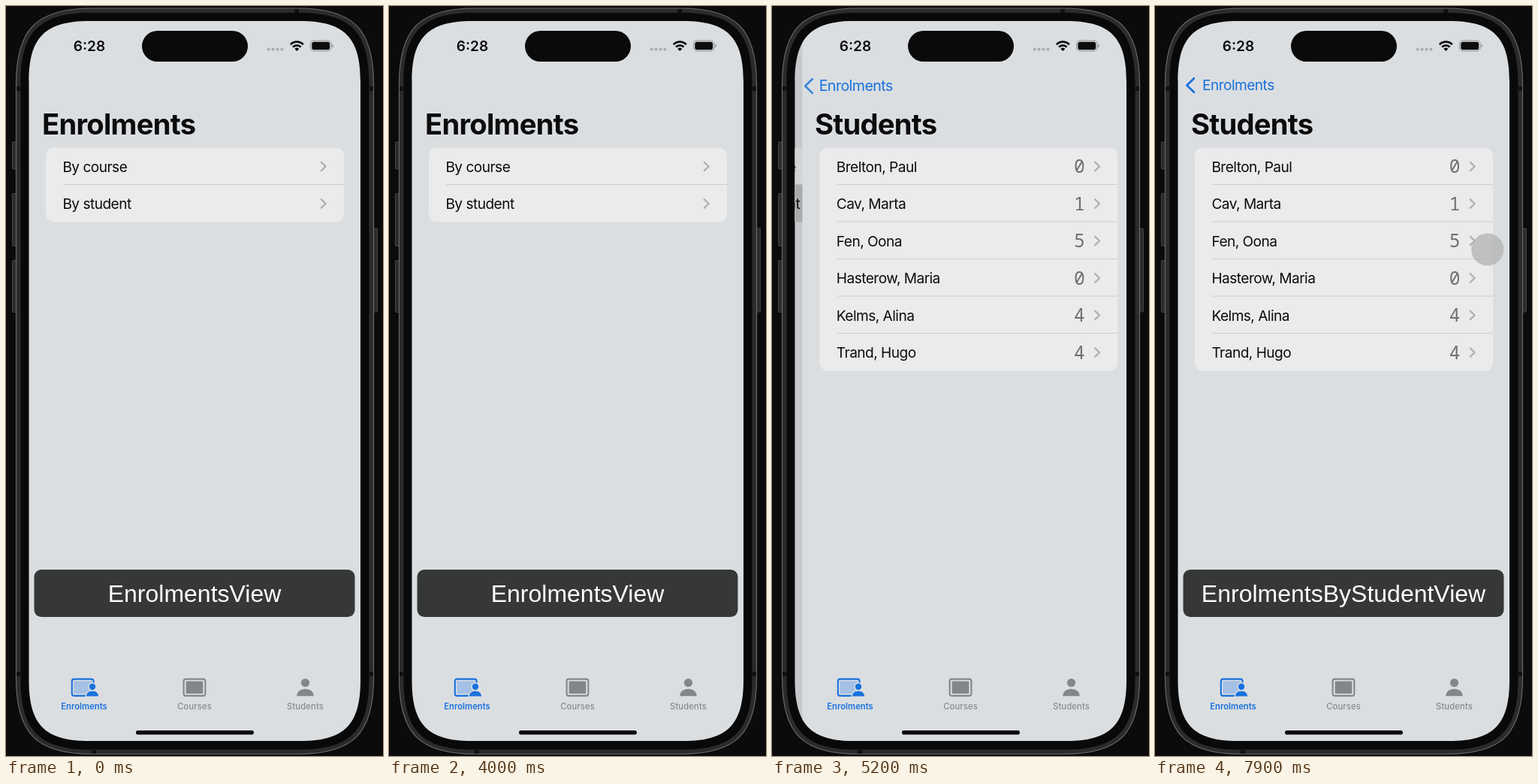
Animation of 502 by 998 pixels, one loop 8000 ms. Source, as an HTML page:

```html
<!DOCTYPE html>
<html lang="en">
<head>
<meta charset="utf-8">
<title>Enrolments</title>
<style>
  html, body { margin: 0; width: 100%; height: 100%; overflow: hidden; background: #0b0b0b; }
  svg { display: block; width: 100vw; height: 100vh; }
  text { font-family: Inter, "Liberation Sans", sans-serif; fill: #0c0c0d; }
  .title { font-size: 38.2px; font-weight: 700; letter-spacing: -.75px; }
  .row, .back { font-size: 19.1px; letter-spacing: -.53px; }
  .back { fill: #1871dc; }
  .clock { font-size: 19.1px; font-weight: 600; }
  .count { font: 24.5px "Noto Sans Mono", "DejaVu Sans Mono", monospace; fill: #6f6f70; text-anchor: middle; }
  .tab { font-size: 11.2px; font-weight: 500; letter-spacing: .15px; fill: #88898b; text-anchor: middle; }
  .tab.on { fill: #1871dc; font-weight: 600; letter-spacing: .05px; }
  .banner rect { fill: #363837; }
  .banner text { font: 32px "Liberation Sans", Arial, sans-serif; fill: #fff; text-anchor: middle; }
  .list { fill: #ebebeb; }
  .rule { stroke: #cdcecf; stroke-width: 1; }
  .chevron { fill: none; stroke: #b0b0b2; stroke-width: 2.3; stroke-linecap: round; stroke-linejoin: round; }
  .metal { fill: #2b2b2b; stroke: #444; stroke-width: 1; }
  .mark { fill: #111; }
</style>
</head>
<body>
<svg viewBox="0 0 502 998" preserveAspectRatio="none">
  <defs>
    <clipPath id="screen"><path id="screenShape"/></clipPath>
    <clipPath id="shortList"><rect x="53" y="188.5" width="397" height="99" rx="11"/></clipPath>
  </defs>

  <!-- phone body -->
  <rect width="502" height="998" fill="#0b0b0b"/>
  <g class="metal">
    <rect x="8.5" y="181" width="6" height="36" rx="1"/>
    <rect x="8.5" y="249.5" width="6" height="70" rx="1"/>
    <rect x="8.5" y="338.5" width="6" height="69" rx="1"/>
    <rect x="488" y="296" width="6.5" height="111" rx="1"/>
  </g>
  <path id="body" fill="#2b2b2b" stroke="#686868" stroke-width="1.2"/>
  <g class="mark">
    <rect x="384" y="4" width="6" height="5"/>
    <rect x="114" y="990" width="6" height="5"/>
    <rect x="14" y="107" width="5" height="6"/>
    <rect x="484" y="107" width="5" height="6"/>
    <rect x="14" y="886" width="5" height="6"/>
    <rect x="484" y="886" width="5" height="6"/>
  </g>
  <path id="bezel" fill="#090909"/>

  <g clip-path="url(#screen)">
    <g id="oldPage">
      <rect x="28" y="18" width="446" height="962" fill="#dbdee1"/>
      <g clip-path="url(#shortList)">
        <rect class="list" x="53" y="188.5" width="397" height="99"/>
        <rect id="pressed" x="53" y="238" width="397" height="50" fill="#bebec0"/>
      </g>
      <g id="menu"></g>
    </g>
    <rect id="dim" x="28" y="18" width="446" height="962"/>
    <g id="newPage">
      <rect x="30" y="18" width="444" height="962" fill="#dbdee1"/>
      <rect class="list" x="53" y="188.5" width="397" height="297" rx="11"/>
      <g id="people"></g>
    </g>

    <!-- navigation bar -->
    <text id="newTitle" class="title" x="48" y="171">Students</text>
    <g id="oldTitle"><text class="title">Enrolments</text></g>
    <g id="back"><text class="back">Enrolments</text></g>
    <path id="backArrow" d="M52 96.2l-9.6 9.3 9.6 9.3" fill="none" stroke="#1871dc" stroke-width="2.7" stroke-linecap="round" stroke-linejoin="round"/>

    <!-- status bar -->
    <text class="clock" x="89.8" y="60">6:28</text>
    <rect x="181" y="33" width="141" height="41" rx="20.5" fill="#0a0a0a"/>
    <g fill="#abaeb0">
      <circle cx="349.7" cy="57.7" r="2.1"/><circle cx="355.6" cy="57.7" r="2.1"/>
      <circle cx="361.5" cy="57.7" r="2.1"/><circle cx="367.4" cy="57.7" r="2.1"/>
    </g>
    <g fill="none" stroke="#0c0c0d" stroke-width="2.7">
      <path d="M378.8 51.2a12 12 0 0 1 17 0"/>
      <path d="M382 54.6a7.5 7.5 0 0 1 10.6 0"/>
      <path d="M384.3 57a4.3 4.3 0 0 1 6 0l-3 3z" fill="#0c0c0d" stroke="none"/>
    </g>
    <rect x="405.5" y="46" width="27.5" height="14" rx="4.5" fill="none" stroke="#929496" stroke-width="1.1"/>
    <rect x="407.3" y="47.8" width="23.9" height="10.4" rx="2.8" fill="#0c0c0d"/>
    <path d="M434.4 50.7q1.8.8 1.8 2.3t-1.8 2.3z" fill="#929496"/>

    <!-- tab bar -->
    <rect x="87.8" y="895.6" width="28.8" height="22.3" rx="3" fill="none" stroke="#1871dc" stroke-width="2.1"/>
    <rect x="90.3" y="898.2" width="23.8" height="17.1" rx="1" fill="#a5c0e5"/>
    <g fill="#1871dc" stroke="#dbdee1" stroke-width="3" paint-order="stroke">
      <path d="M107 918.6c0-4.2 3.3-7 8-7s8 2.8 8 7z"/>
      <circle cx="115" cy="905.8" r="4.2"/>
    </g>
    <rect x="236.6" y="895.6" width="28.8" height="22.3" rx="3" fill="none" stroke="#858688" stroke-width="2.1"/>
    <rect x="239.7" y="898.6" width="22.6" height="16.3" rx="1" fill="#858688"/>
    <g fill="#858688">
      <circle cx="398.5" cy="900.5" r="5.6"/>
      <path d="M387.3 918.2c0-5.6 4.8-9.4 11.2-9.4s11.2 3.8 11.2 9.4z"/>
    </g>
    <text class="tab on" x="104" y="936">Enrolments</text>
    <text class="tab" x="251" y="936">Courses</text>
    <text class="tab" x="398.5" y="936">Students</text>
    <rect x="173" y="964" width="157" height="5.6" rx="2.8" fill="#0a0a0a"/>
  </g>

  <g class="banner">
    <rect id="bannerBox" x="37.5" y="750" width="427" height="63" rx="9.5"/>
    <text id="bannerText" x="251" y="793"></text>
  </g>
  <circle id="touch" fill="#b0b0b1"/>
</svg>

<script>
const LOOP = 8000, STEP = 100;
const PUSH_START = 4650, PUSH_END = 5400, SPRING = 10.26;
const $ = id => document.getElementById(id);
const clamp = (v, lo = 0, hi = 1) => Math.min(hi, Math.max(lo, v));
const mix = (a, b, k) => a + (b - a) * k;
const set = (id, attrs) => {
  for (const key in attrs) $(id).setAttribute(key, attrs[key]);
};

// Rounded rectangle whose corners ease into the straight sides
function smoothRect(x, y, w, h, r) {
  const a = 1.3 * r, b = a - 0.952 * r;
  return `M${x + a} ${y}h${w - 2 * a}c${a - b} 0 ${a} ${b} ${a} ${a}` +
    `v${h - 2 * a}c0 ${a - b} ${-b} ${a} ${-a} ${a}` +
    `h${2 * a - w}c${b - a} 0 ${-a} ${-b} ${-a} ${-a}` +
    `v${2 * a - h}c0 ${b - a} ${b} ${-a} ${a} ${-a}z`;
}
set("body", { d: smoothRect(13.5, 3, 476, 992.5, 78) });
set("bezel", { d: smoothRect(19.5, 9, 464, 980.5, 72) });
set("screenShape", { d: smoothRect(30.5, 20, 441.5, 958, 62) });

function fillList(id, rows) {
  $(id).innerHTML = rows.map(([label, count], i) => {
    const y = 213.5 + 49.5 * i;
    return `<text class="row" x="75.4" y="${y + 7}">${label}</text>` +
      (count === undefined ? "" : `<text class="count" x="399" y="${y + 8.8}">${count}</text>`) +
      `<path class="chevron" d="M419.8 ${y - 5.7}l5.9 5.7-5.9 5.7"/>` +
      (i ? `<path class="rule" d="M76 ${y - 25.5}H450"/>` : "");
  }).join("");
}
fillList("menu", [["By course"], ["By student"]]);
fillList("people", [
  ["Brelton, Paul", 0], ["Cav, Marta", 1], ["Fen, Oona", 5],
  ["Hasterow, Maria", 0], ["Kelms, Alina", 4], ["Trand, Hugo", 4]
]);

// Critically damped spring from 0 to 1
function pushProgress(t) {
  if (t < PUSH_START) return 0;
  if (t >= PUSH_END) return 1;
  const s = SPRING * (t - PUSH_START) / 1000;
  return 1 - (1 + s) * Math.exp(-s);
}

function drawPush(t) {
  const p = pushProgress(t), q = 1 - p;
  set("oldPage", { transform: `translate(${-132.5 * p} 0)`, opacity: q ? 1 : 0 });
  set("newPage", { transform: `translate(${442 * q} 0)` });
  set("dim", { opacity: q ? 0.1 * p : 0 });
  set("newTitle", { transform: `translate(${380 * q} 0)`, opacity: p ? 1 : 0 });
  const x = mix(48, 63, p), y = mix(171, 112, p);
  set("oldTitle", { transform: `translate(${x} ${y}) scale(${mix(1, 0.478, p)})`, opacity: clamp(1 - 1.6 * p) });
  set("back", { transform: `translate(${x} ${y}) scale(${mix(2.09, 1, p)})`, opacity: clamp(1.8 * p - 0.6) });
  set("backArrow", { transform: `translate(${75 * q} ${45 * q})`, opacity: clamp(1 - 8 * q) });
  set("pressed", { opacity: t >= 4600 ? 1 : 0 });
}

function drawBanner(t) {
  const label = t < 4700 ? "EnrolmentsView" : t < PUSH_END ? "" : "EnrolmentsByStudentView";
  if ($("bannerText").textContent !== label) $("bannerText").textContent = label;
  set("bannerBox", { opacity: label ? 1 : 0 });
}

function drawTouch(t) {
  if (t >= 7300) {
    set("touch", { cx: 442.8, cy: 324, r: 21.6, opacity: 0.72 });
    return;
  }
  const k = clamp((t - 4700) / 400), fade = clamp((5200 - t) / 500);
  set("touch", {
    cx: mix(453, 450, k), cy: mix(274, 341, k), r: mix(21.6, 25, k),
    opacity: t < 4400 ? 0 : 0.72 * fade
  });
}

const start = performance.now();
function tick() {
  const elapsed = (performance.now() - start) % LOOP;
  const t = Math.floor(elapsed / STEP) * STEP;
  drawPush(t);
  drawBanner(t);
  drawTouch(t);
  requestAnimationFrame(tick);
}
tick();
</script>
</body>
</html>
```
